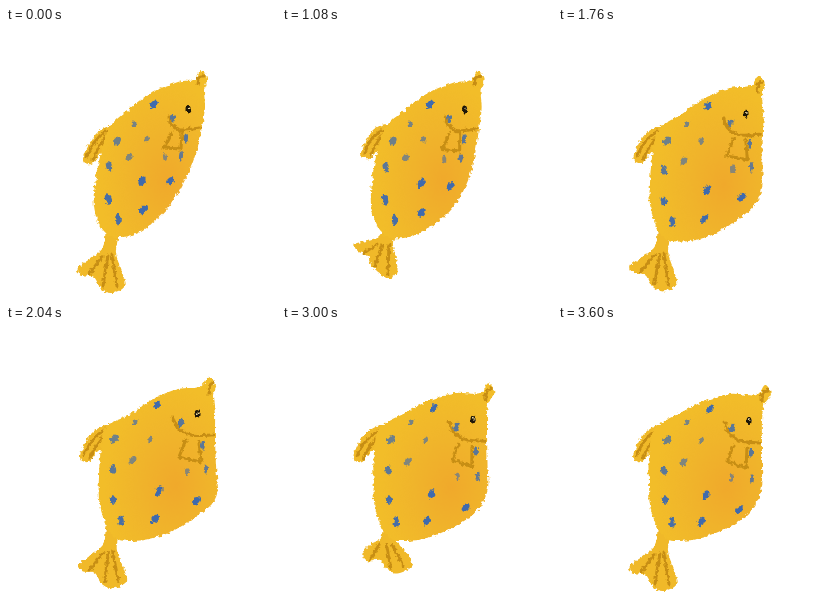
These frames come from a looping animation (270 by 270 pixels, 3.88 s). An HTML page:

```html
<!DOCTYPE html>
<html lang="en">
<head>
<meta charset="utf-8">
<title>Spotted fish</title>
<style>
  html, body { margin: 0; width: 100%; height: 100%; overflow: hidden; background: #fff; }
  svg { display: block; width: 100vw; height: 100vh; }
  .skin { fill: #f0b929; }
  .line { fill: none; stroke: #c78e14; stroke-width: 3; stroke-linecap: round; stroke-linejoin: round; }
</style>
</head>
<body>
<svg id="stage" viewBox="0 0 270 270">
  <defs>
    <radialGradient id="glow" cx=".64" cy=".66" r=".6">
      <stop offset="0" stop-color="#f0a92b"/>
      <stop offset=".5" stop-color="#f0b42b"/>
      <stop offset="1" stop-color="#f2bd29"/>
    </radialGradient>
    <filter id="crayon" filterUnits="userSpaceOnUse" x="0" y="0" width="270" height="270" color-interpolation-filters="sRGB">
      <feTurbulence type="fractalNoise" baseFrequency=".28" numOctaves="2" seed="4"/>
      <feDisplacementMap in="SourceGraphic" scale="5" xChannelSelector="R" yChannelSelector="G"/>
    </filter>
  </defs>
  <g id="fish" filter="url(#crayon)"></g>
</svg>
<script>
const LOOP = 3880, END = 3600, STEP = 40;
const fish = document.getElementById('fish');

const points = text => text.split(' ').map(p => p.split(',').map(Number));
const mix = (a, b, k) => a + (b - a) * k;
const mixPoint = (p, q, k) => [mix(p[0], q[0], k), mix(p[1], q[1], k)];

function add(tag, attrs) {
  const el = document.createElementNS('http://www.w3.org/2000/svg', tag);
  for (const name in attrs) el.setAttribute(name, attrs[name]);
  return fish.appendChild(el);
}

// Smooth curve through the points
function curve(pts, closed) {
  const n = pts.length;
  const at = i => pts[closed ? (i + n) % n : Math.max(0, Math.min(n - 1, i))];
  let d = 'M' + pts[0];
  for (let i = 0; i < (closed ? n : n - 1); i++) {
    const [a, b, c, e] = [at(i - 1), at(i), at(i + 1), at(i + 2)];
    const c1 = b.map((v, j) => v + (c[j] - a[j]) / 6);
    const c2 = c.map((v, j) => v - (e[j] - b[j]) / 6);
    d += `C${c1} ${c2} ${c}`;
  }
  return d + (closed ? 'Z' : '');
}

// Smooth value through [time, value] keys
function track(keys, t) {
  let i = 0;
  while (i < keys.length - 2 && t > keys[i + 1][0]) i++;
  const slope = j => {
    const a = keys[Math.max(0, j - 1)], b = keys[Math.min(keys.length - 1, j + 1)];
    return (b[1] - a[1]) / (b[0] - a[0]);
  };
  const [t0, v0] = keys[i], [t1, v1] = keys[i + 1];
  const h = t1 - t0, u = (t - t0) / h, w = 1 - u;
  return w * w * (1 + 2 * u) * v0 + u * u * (3 - 2 * u) * v1
    + h * u * w * (w * slope(i) - u * slope(i + 1));
}

// Progress through the slim (0), wide (1) and resting (2) poses
const headKeys = [[0, 0], [1080, .06], [1440, .3], [2040, 1], [2680, 1.6], [3320, 1.93], [3600, 2]];
const bellyKeys = [[0, 0], [1080, .22], [1440, .5], [2040, 1], [2680, 1.45], [3320, 1.93], [3600, 2]];
// Tail: -1 short, 0 long, 1 curled to the right
const tailKeys = [[0, 0], [560, -.67], [880, -1.05], [1080, -1], [1440, -.55], [1680, -.2], [1880, 0],
  [2040, .12], [2240, .38], [2680, 1], [3320, .48], [3600, 0]];
const finX = [[0, 0], [1080, 2], [1440, 0], [2040, -3], [2680, -7], [3320, -3], [3600, -2]];
const finY = [[0, 0], [1080, -5], [1440, -3], [2040, 0], [3600, 0]];

const body = [
  '195,43 201,51 198,62 199,80 195,104 190,125 180,150 162,180 135,203 113,209 97,203 88,178 90,150 95,125 104,99 122,82 145,65 172,54 188,52',
  '203,51 210,60 207,70 209,88 209,112 210,140 211,168 197,186 160,208 127,215 106,209 94,180 93,150 95,122 100,101 125,88 147,73 172,63 194,61',
  '207,59 213,68 206,79 204,95 204,118 204,140 203,165 188,190 153,209 122,215 105,210 93,184 91,155 91,128 97,102 122,87 147,75 172,68 198,69'
].map(points);
const spots = [
  '148,76 166,91 128,96 111,113 141,111 123,129 103,138 136,153 159,129 180,110 175,128 164,153 102,171 137,182 112,191',
  '151,79 175,97 129,96 108,113 144,114 127,134 107,143 153,165 181,146 197,119 200,143 190,175 107,174 149,193 115,195',
  '152,83 174,102 129,96 109,114 143,115 126,136 106,144 148,169 174,152 193,127 194,153 181,184 107,174 143,196 114,197'
].map(points);
const eye = ['182,81', '191,88', '191,95'].map(points);
const mouth = ['163,88 165,96 174,102 194,100', '167,92 172,102 185,109 206,109', '167,97 172,108 183,115 202,117'].map(points);
const nose = ['191,56 193,49 198,48', '203,68 204,59 208,57', '204,75 205,67 210,64'].map(points);
const paddle = ['166,104 158,120 175,121 176,103', '180,113 173,131 195,136 193,116', '176,120 169,135 188,142 189,122'].map(points);
const tail = [
  '101,200 98,208 90,212 73,216 77,224 85,227 91,240 105,250 115,245 114,230 111,216 112,205',
  '101,200 98,217 91,226 72,240 75,247 87,249 95,261 106,265 119,258 117,247 110,225 112,205',
  '102,200 99,212 89,215 82,226 88,233 100,231 107,240 117,244 131,238 130,228 117,215 112,205'
].map(points);
const rays = [
  '95,216 82,225 100,217 93,238 107,217 106,246',
  '97,228 83,246 102,228 97,258 106,227 111,258',
  '97,217 90,230 105,217 111,238 111,217 123,236'
].map(points);
// Half width, half height, opacity, angle
const spotLooks = [[3, 5, .95, 35], [2.6, 4.4, .8, 25], [2, 2.8, .65, 40], [3.2, 4.8, .7, 35], [2.2, 3.4, .6, 30],
  [3, 4.4, .6, 30], [3, 4.8, .8, -15], [3.2, 5, .95, 25], [2, 3.8, .55, -5], [2, 4.6, .8, 5],
  [2, 4.6, .75, 5], [3, 4.6, .95, 45], [3, 4.8, .9, -15], [3.2, 5, .95, 40], [2.8, 5.2, .9, -5]];

const skin = () => add('path', { class: 'skin' });
const line = () => add('path', { class: 'line' });
const tailSkin = skin(), tailLines = line(), finSkin = skin(), finLines = line();
const bodySkin = add('path', { fill: 'url(#glow)' });
const spotEls = spotLooks.map(([rx, ry, opacity]) => add('ellipse', { rx, ry, opacity, fill: '#3566b4' }));
const paddleLine = line(), mouthLine = line(), noseLine = line();
const eyeEl = add('ellipse', { rx: 2.5, ry: 4, fill: '#1d1608' });
const glint = add('circle', { r: .9, fill: '#f4dfa0' });
const setPath = (el, d) => el.setAttribute('d', d);

function draw(t) {
  const head = track(headKeys, t), belly = track(bellyKeys, t);
  const pose = ([slim, wide, rest]) => slim.map((p, i) => {
    const k = mix(head, belly, Math.max(0, Math.min(1, (p[1] - 80) / 90)));
    return k < 1 ? mixPoint(p, wide[i], k) : mixPoint(wide[i], rest[i], k - 1);
  });

  const swing = track(tailKeys, t);
  const sway = ([short, long, curl]) =>
    long.map((p, i) => mixPoint(p, (swing < 0 ? short : curl)[i], Math.abs(swing)));
  setPath(tailSkin, curve(sway(tail), true));
  const r = sway(rays);
  setPath(tailLines, `M${r[0]}L${r[1]}M${r[2]}L${r[3]}M${r[4]}L${r[5]}`);

  const dx = track(finX, t), dy = track(finY, t);
  const tip = (x, y) => [x + dx, y + dy];
  setPath(finSkin, curve([[108, 97], tip(89, 107), tip(77, 130), tip(85, 136), tip(95, 125), [106, 115]], true));
  setPath(finLines, `M100,103Q${tip(87, 112)} ${tip(81, 129)}M100,108Q${tip(93, 117)} ${tip(87, 132)}`);

  setPath(bodySkin, curve(pose(body), true));
  pose(spots).forEach((p, i) =>
    spotEls[i].setAttribute('transform', `translate(${p}) rotate(${spotLooks[i][3]})`));
  setPath(paddleLine, 'M' + pose(paddle).join('L'));
  setPath(mouthLine, curve(pose(mouth)));
  setPath(noseLine, curve(pose(nose)));
  const [[x, y]] = pose(eye);
  eyeEl.setAttribute('transform', `translate(${x},${y})`);
  glint.setAttribute('transform', `translate(${x + .8},${y - .8})`);
}

const start = performance.now();
function tick() {
  const t = (performance.now() - start) % LOOP;
  draw(Math.min(END, Math.floor(t / STEP) * STEP));
  requestAnimationFrame(tick);
}
tick();
</script>
</body>
</html>
```
